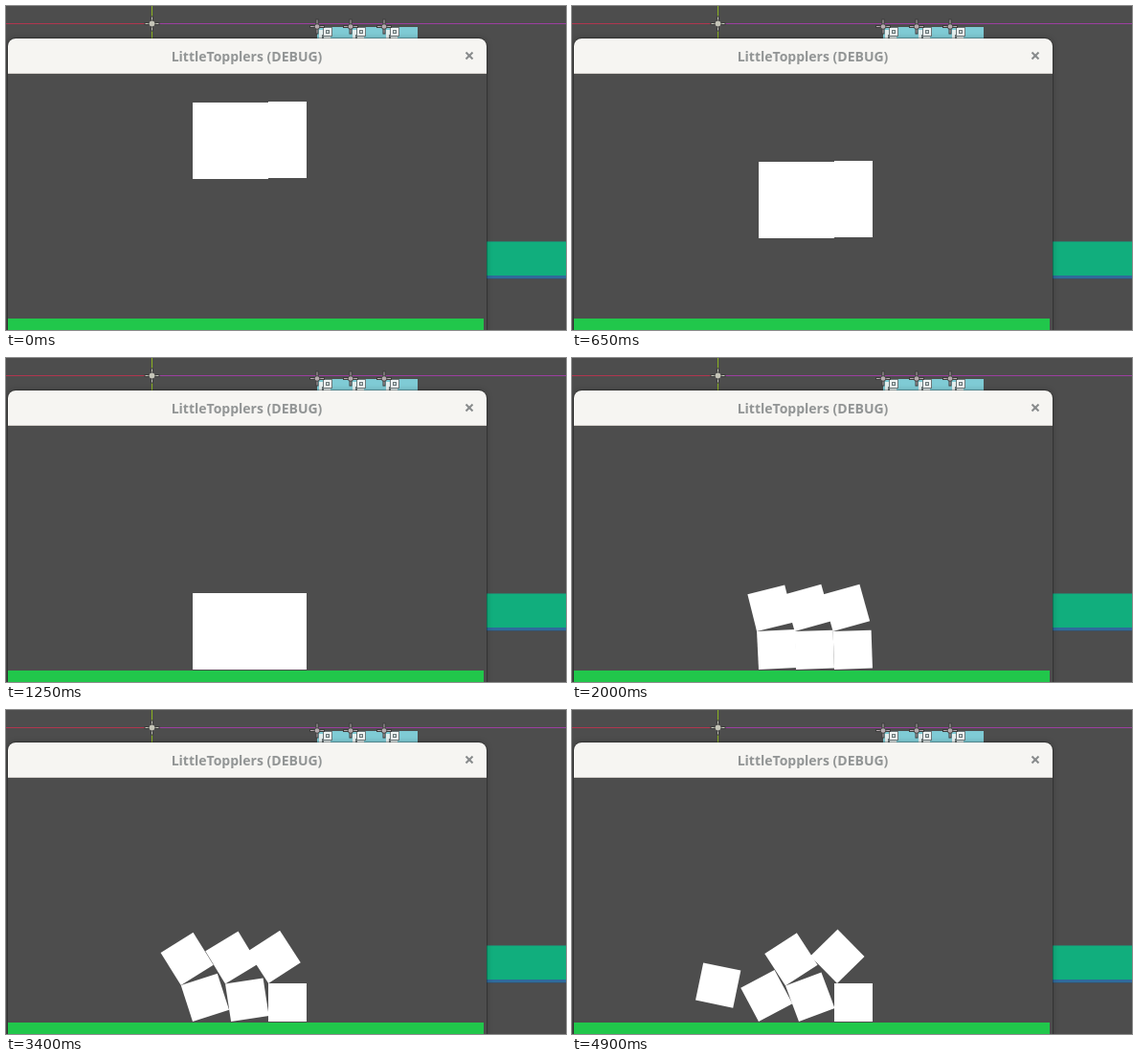
An HTML page with a canvas for the animation above (4950 ms loop, 585 by 339 pixels).

```html
<!DOCTYPE html>
<html lang="en">
<head>
<meta charset="utf-8">
<title>Falling boxes</title>
<style>
  html, body { margin: 0; width: 100%; height: 100%; overflow: hidden; background: #4d4d4d; }
  canvas { display: block; }
</style>
</head>
<body>
<canvas id="stage" width="585" height="339"></canvas>
<script>
const ctx = document.getElementById('stage').getContext('2d');
const LOOP = 4950, STEP = 50, SIZE = 40, GROUND = 326;
const IMPACT = 1.25, END = 3.65; // seconds: landing time, then length of the tumble

const clamp01 = v => Math.min(1, Math.max(0, v));
const swing = (s, from, to) => (1 - Math.cos(Math.PI * clamp01((s - from) / (to - from)))) / 2;
const jolt = s => 1 - (1 - clamp01(s / 0.4)) ** 2;

// Each column is a lower box tilting on its bottom left corner and an upper
// box standing on the lower one's top left corner. Leans are in degrees to the left.
const COLUMNS = [
  {
    x: 195, bottom: 181,
    drift: s => 0,
    lowerLean: s => 28 * swing(s, 0, END),
    upperLean: s => Math.min(78.3, 12.3 * jolt(s) + 3.25 * s ** 2.35),
    slide: s => {
      const p = clamp01((s - 2.95) / 0.7);
      return [-8 * p, 21 * p * p];
    }
  },
  {
    x: 234, bottom: 181,
    drift: s => 3 * swing(s, 1.1, END),
    lowerLean: s => 2 * jolt(s) + 18.5 * swing(s, 1.1, END),
    upperLean: s => 12.3 * jolt(s) + 11.6 * (1 - Math.cos(Math.PI * s / 3)),
    slide: s => [0, 0]
  },
  {
    x: 274, bottom: 180,
    drift: s => 0,
    lowerLean: s => 2 * jolt(s) * (1 - swing(s, 0.75, 2.15)),
    upperLean: s => 12.3 * jolt(s) + 32.2 * swing(s, 0, END),
    slide: s => [3 * swing(s, 2, 3), 0]
  }
];

function rect(color, x, y, w, h) {
  ctx.fillStyle = color;
  ctx.fillRect(x, y, w, h);
}

function line(color, width, ...points) {
  ctx.strokeStyle = color;
  ctx.lineWidth = width;
  ctx.beginPath();
  points.forEach(([x, y]) => ctx.lineTo(x, y));
  ctx.stroke();
}

// Draws a box standing on its bottom left corner.
function drawBox(x, y, lean) {
  ctx.save();
  ctx.translate(x, y);
  ctx.rotate(-lean);
  rect('#fff', 0, -SIZE, SIZE, SIZE);
  ctx.restore();
}

function drawColumn(column, time) {
  const s = Math.max(0, time - IMPACT);
  const drop = Math.round(65.9 * time + 45.45 * time * time);
  const x = column.x + column.drift(s);
  const y = Math.min(GROUND, column.bottom + drop);
  const lower = column.lowerLean(s) * Math.PI / 180;
  const upper = column.upperLean(s) * Math.PI / 180;
  const [dx, dy] = column.slide(s);
  drawBox(x, y, lower);
  drawBox(x - SIZE * Math.sin(lower) + dx, y - SIZE * Math.cos(lower) + dy, upper);
}

function pivot(x, y, radius, color) {
  rect('#3d3d3d', x - 1.5, y - 8, 3, 16);
  rect('#3d3d3d', x - 8, y - 1.5, 16, 3);
  rect(color, x - 0.5, y - 7, 1, 14);
  rect(color, x - 7, y - 0.5, 14, 1);
  ctx.fillStyle = color;
  ctx.strokeStyle = '#444';
  ctx.lineWidth = 1;
  ctx.beginPath();
  ctx.arc(x, y, radius, 0, Math.PI * 2);
  ctx.fill();
  ctx.stroke();
}

function groupIcon(x) {
  rect('#e4eeee', x + 2, 25, 12, 9);
  rect('#6c7779', x + 5, 30, 7, 4);
  rect('#e4eeee', x + 7, 32, 5, 2);
  rect('#6c7779', x + 6, 22, 10, 10);
  rect('#f0f4f4', x + 7, 23, 8, 8);
  rect('#6c7779', x + 9, 25, 4, 4);
  rect('#c8d4d4', x + 10, 26, 2, 2);
}

function drawEditor() {
  rect('#4d4d4d', 0, 0, 585, 339);
  rect('#b0364f', 0, 18, 153, 1);
  rect('#9c3fa0', 153, 18, 432, 1);
  rect('#8bb321', 152, 0, 1, 40);
  rect('#7fcbd5', 325, 22, 105, 13);
  for (let x = 325; x < 430; x += 35) {
    groupIcon(x);
    pivot(x, 21.5, 2.8, '#b5aaae');
  }
  pivot(152.5, 18.5, 3.5, '#c5c5b8');
  rect('#11ae7d', 495, 247, 90, 36);
  rect('#2b806c', 495, 246, 90, 1);
  rect('#2f6b9b', 495, 282, 90, 3);
  rect('#3c5064', 495, 285, 90, 1);
}

function drawWindow() {
  ctx.save();
  ctx.shadowColor = 'rgba(0,0,0,.25)';
  ctx.shadowBlur = 6;
  ctx.fillStyle = '#f6f5f2';
  ctx.beginPath();
  ctx.roundRect(2, 34, 500, 330, 8);
  ctx.fill();
  ctx.restore();
  ctx.strokeStyle = 'rgba(0,0,0,.25)';
  ctx.lineWidth = 1;
  ctx.beginPath();
  ctx.roundRect(1.5, 33.5, 501, 331, 8.5);
  ctx.stroke();
  rect('#d6d2cd', 2, 70, 500, 1);
  rect('#4d4d4d', 2, 71, 500, 268);

  ctx.fillStyle = '#929595';
  ctx.font = 'bold 14px "Open Sans", "Noto Sans", sans-serif';
  ctx.textAlign = 'center';
  ctx.fillText('LittleTopplers (DEBUG)', 251.5, 58);
  line('#878a8b', 2, [480.5, 48.5], [487.5, 55.5]);
  line('#878a8b', 2, [487.5, 48.5], [480.5, 55.5]);
}

function frame() {
  const time = Math.floor((performance.now() % LOOP) / STEP) * STEP / 1000;
  drawEditor();
  drawWindow();
  rect('#21c74b', 2, 327, 497, 12);
  COLUMNS.forEach(column => drawColumn(column, time));
  requestAnimationFrame(frame);
}
frame();
</script>
</body>
</html>
```
